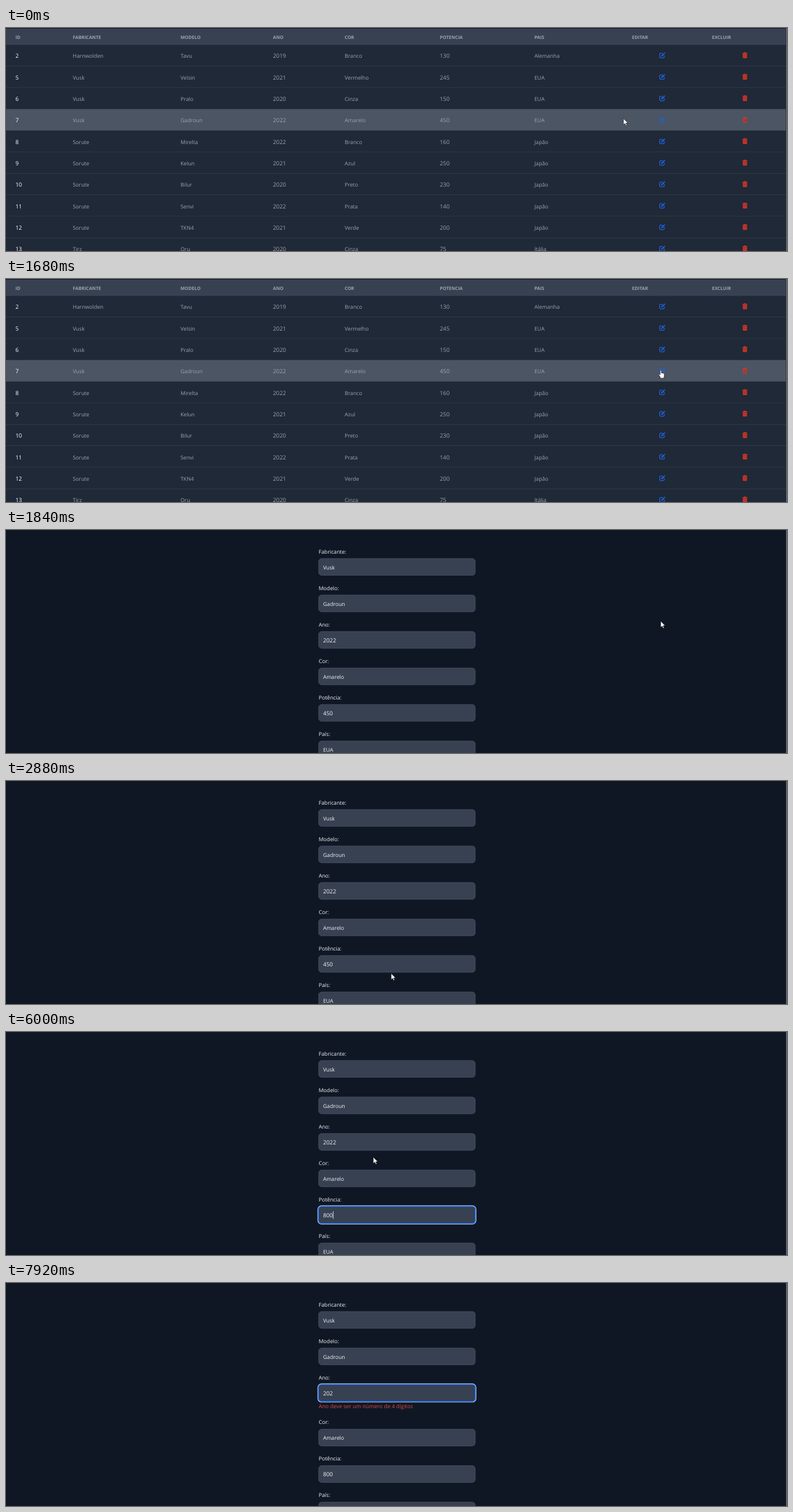
Write an HTML page that moves like this. It is 1280 px wide and 367 px high and loops after 8 s.

```html
<!DOCTYPE html>
<html lang="pt">
<head>
<meta charset="utf-8">
<title>Carros</title>
<style>
html, body { margin: 0; width: 100%; height: 100%; overflow: hidden; background: #0f1725; }
svg { display: block; width: 1280px; height: 367px; }
text { font-family: "Open Sans", "Noto Sans", sans-serif; font-size: 8.75px; fill: #fff; white-space: pre; text-rendering: geometricPrecision; }
text.num { font-size: 9.33px; }
text.cell { fill: #9ca3af; }
text.head { font-size: 7.5px; font-weight: 700; fill: #9ca3af; }
text.id { font-weight: 500; }
text.value, text.label { fill: #f1f3f6; }
text.error { font-size: 8.9px; fill: #e0463c; }
.box { fill: #374151; stroke: #4b5563; stroke-width: .8; }
</style>
</head>
<body>
<svg id="stage" viewBox="0 0 1280 367">
  <defs>
    <g id="edit">
      <path d="M5 1.6H2.2Q.8 1.6 .8 3v4.6Q.8 9 2.2 9h4.6Q8.2 9 8.2 7.6V5.4" fill="none" stroke="#1f62e0" stroke-width="1.25" stroke-linecap="round"/>
      <path d="M3 7l.5-2.2L7 1.3l1.7 1.7-3.5 3.5zM7.4.9l.5-.5q.5-.4 1 0l.7.7q.4.5 0 1l-.5.5z" fill="#1f62e0"/>
    </g>
    <g id="trash">
      <path d="M0 .9h2.3L2.8 0h2.4l.5.9H8v1.3H0zM.6 2.7h6.8v5.8q0 1.1-1.1 1.1H1.7Q.6 9.6.6 8.5z" fill="#dc3528"/>
      <path d="M2.4 4v4.2M4 4v4.2M5.6 4v4.2" stroke="#7d2a2c" stroke-width=".6"/>
    </g>
    <path id="arrow" d="M0 0v10.3l2.4-2.2 1.6 3.6 1.6-.7-1.6-3.5h3.3z" fill="#fff" stroke="#111" stroke-width=".6"/>
    <path id="hand" d="M-.9 1Q-.9 0 .1 0t1 1v3.8q.9-.7 1.7.2.9-.5 1.6.4 1.5-.4 1.5 1.2v2.6q0 1.4-.7 2.3v1.7H-.6v-1.5L-3 8.1q-.6-1.1.2-1.5.7-.3 1.9 1.2z" fill="#fff" stroke="#111" stroke-width=".6"/>
    <path id="beam" d="M-2-5h1.4q.6 0 .6.6v8.8q0 .6-.6.6H-2M2-5H.6Q0-5 0-4.4v8.8Q0 5 .6 5H2" fill="none" stroke="#c3c8cf" stroke-width=".8"/>
  </defs>
  <g id="table"></g>
  <g id="form"></g>
  <path d="M1278.5 0V367" stroke="#303641"/>
  <path d="M1279.5 0V367" stroke="#7b7f86"/>
  <use id="pointer"/>
</svg>
<script>
const NS = "http://www.w3.org/2000/svg";
const LOOP = 8000, STEP = 80;
const $ = id => document.getElementById(id);

function add(parent, tag, attrs, content) {
  const el = document.createElementNS(NS, tag);
  set(el, attrs);
  if (content !== undefined) el.textContent = content;
  return parent.appendChild(el);
}
function set(el, attrs) {
  for (const key in attrs) el.setAttribute(key, attrs[key]);
}
function show(el, on) {
  el.style.display = on ? "" : "none";
}
function write(parent, x, y, content, kind) {
  const num = /^\d+$/.test(content) ? " num" : "";
  return add(parent, "text", { x, y, class: kind + num }, content);
}

// Table page
const COLS = [15.5, 109.5, 286, 437.5, 555, 711, 866, 1026, 1157];
const HEADS = "ID FABRICANTE MODELO ANO COR POTENCIA PAIS EDITAR EXCLUIR".split(" ");
const CARS = `2 Harnwolden Tavu 2019 Branco 130 Alemanha
5 Vusk Velsin 2021 Vermelho 245 EUA
6 Vusk Pralo 2020 Cinza 150 EUA
7 Vusk Gadroun 2022 Amarelo 450 EUA
8 Sorute Mirelta 2022 Branco 160 Japão
9 Sorute Kelun 2021 Azul 250 Japão
10 Sorute Bilur 2020 Preto 230 Japão
11 Sorute Senvi 2022 Prata 140 Japão
12 Sorute TKN4 2021 Verde 200 Japão
13 Tirz Oru 2020 Cinza 75 Itália`.split("\n").map(line => line.split(" "));
const ROW = 35.333, TOP = 27.8, HOVERED = 3;

function buildTable() {
  const g = $("table");
  add(g, "rect", { y: 1, width: 1278, height: 27, fill: "#374151" });
  HEADS.forEach((head, i) => write(g, COLS[i], 17.8, head, "head"));
  CARS.forEach((car, r) => {
    const y = TOP + r * ROW, hot = r === HOVERED;
    add(g, "rect", { y, width: 1278, height: ROW, fill: hot ? "#4b5563" : "#1f2937" });
    add(g, "rect", { y: y + ROW - .8, width: 1278, height: .8, fill: "#3b4554" });
    car.forEach((value, c) => write(g, COLS[c], y + 21.6, value, c ? "cell" : "id"));
    const opacity = hot ? .85 : 1;
    add(g, "use", { href: "#edit", x: 1070.6, y: y + 12.3, opacity });
    add(g, "use", { href: "#trash", x: 1207, y: y + 12.3, opacity });
  });
}

// Form page
const LABELS = ["Fabricante:", "Modelo:", "Ano:", "Cor:", "Potência:", "País:"];
const YEAR = 2, POWER = 4, LEFT = 512.4, WIDTH = 256.6, PITCH = 60.05;
const fieldTop = i => 47 + i * PITCH;
const fields = [];
let error;

function buildForm() {
  const g = $("form");
  LABELS.forEach((label, i) => {
    const y = fieldTop(i);
    const box = add(g, "g", {});
    write(box, LEFT, y - 8.3, label, "label");
    add(box, "rect", { x: LEFT, y, width: WIDTH, height: 27.6, rx: 5, class: "box" });
    const ring = add(box, "g", { fill: "none" });
    add(ring, "rect", { x: LEFT - .2, y: y - .2, width: WIDTH + .4, height: 28, rx: 5, stroke: "#1c5fdc", "stroke-width": 1.6 });
    add(ring, "rect", { x: LEFT - 1.3, y: y - 1.3, width: WIDTH + 2.6, height: 30.2, rx: 6, stroke: "#9cc5f7", "stroke-width": 1.2 });
    const mark = add(box, "rect", { x: 519.6, y: y + 7.7, width: 16.3, height: 13.3, fill: "#1a6fd6" });
    const value = write(box, 519.7, y + 17.8, CARS[HOVERED][i + 1], "value");
    const caret = add(box, "rect", { y: y + 8, width: .8, height: 12.4, fill: "#fff" });
    fields.push({ box, ring, mark, value, caret });
  });
  error = write(g, LEFT, 205.6, "Ano deve ser um número de 4 dígitos", "error");
}

// Timeline, in ms
const OPEN = 1760, ENTER_POWER = 3200, SELECT = 3360, ENTER_YEAR = 6640, ERASE = 7360;
const TYPED = [[0, "450"], [4640, "8"], [4800, "80"], [4960, "800"]];
const HIDDEN = [[4640, 5440], [7120, LOOP]];
const PATH = [
  [0, 1012, 149], [480, 1012, 149], [1200, 1073, 150], [2000, 1073, 150],
  [2640, 640, 320], [2800, 636, 319], [3120, 605.5, 304], [5440, 605.5, 304],
  [5920, 602, 206], [6160, 602, 206], [6480, 606, 184], [LOOP, 606, 184]
];
const last = (steps, t) => steps.filter(s => s[0] <= t).pop();
const blink = (t, since) => (t - since) % 1000 < 500;

function pointerAt(t) {
  const i = PATH.findIndex(p => p[0] > t);
  const [t0, x0, y0] = PATH[i - 1], [t1, x1, y1] = PATH[i];
  const u = (t - t0) / (t1 - t0), k = u * u * (3 - 2 * u);
  return [x0 + (x1 - x0) * k, y0 + (y1 - y0) * k];
}
function pointerKind(t, x, y) {
  if (t < OPEN) return x > 1070 && x < 1081 ? "hand" : "arrow";
  const inField = LABELS.some((_, i) => y >= fieldTop(i) && y <= fieldTop(i) + 28);
  return inField && x > LEFT && x < LEFT + WIDTH ? "beam" : "arrow";
}

function drawForm(t) {
  const current = t >= ENTER_YEAR ? YEAR : t >= ENTER_POWER ? POWER : -1;
  const invalid = t >= ERASE;
  const [typedAt, power] = last(TYPED, t);
  const year = invalid ? "202" : "2022";
  fields[POWER].value.textContent = power;
  fields[YEAR].value.textContent = year;
  const selected = current === POWER && t >= SELECT && typedAt === 0;
  const since = current === YEAR ? (invalid ? ERASE : ENTER_YEAR) : typedAt || ENTER_POWER;
  const length = current === YEAR ? year.length : power.length;
  fields.forEach((f, i) => {
    const on = i === current;
    show(f.ring, on);
    show(f.mark, on && selected);
    show(f.caret, on && !selected && blink(t, since));
    f.caret.setAttribute("x", 519.8 + length * 5.34);
    f.box.setAttribute("transform", `translate(0 ${invalid && i > YEAR ? 13.4 : 0})`);
  });
  show(error, invalid);
}

function draw(t) {
  show($("table"), t < OPEN);
  show($("form"), t >= OPEN);
  drawForm(t);
  const [x, y] = pointerAt(t), pointer = $("pointer");
  show(pointer, !HIDDEN.some(([a, b]) => t >= a && t < b));
  set(pointer, { href: "#" + pointerKind(t, x, y), x, y });
}

buildTable();
buildForm();
const start = performance.now();
function tick() {
  const t = (performance.now() - start) % LOOP;
  draw(Math.floor(t / STEP) * STEP);
  requestAnimationFrame(tick);
}
tick();
</script>
</body>
</html>
```
